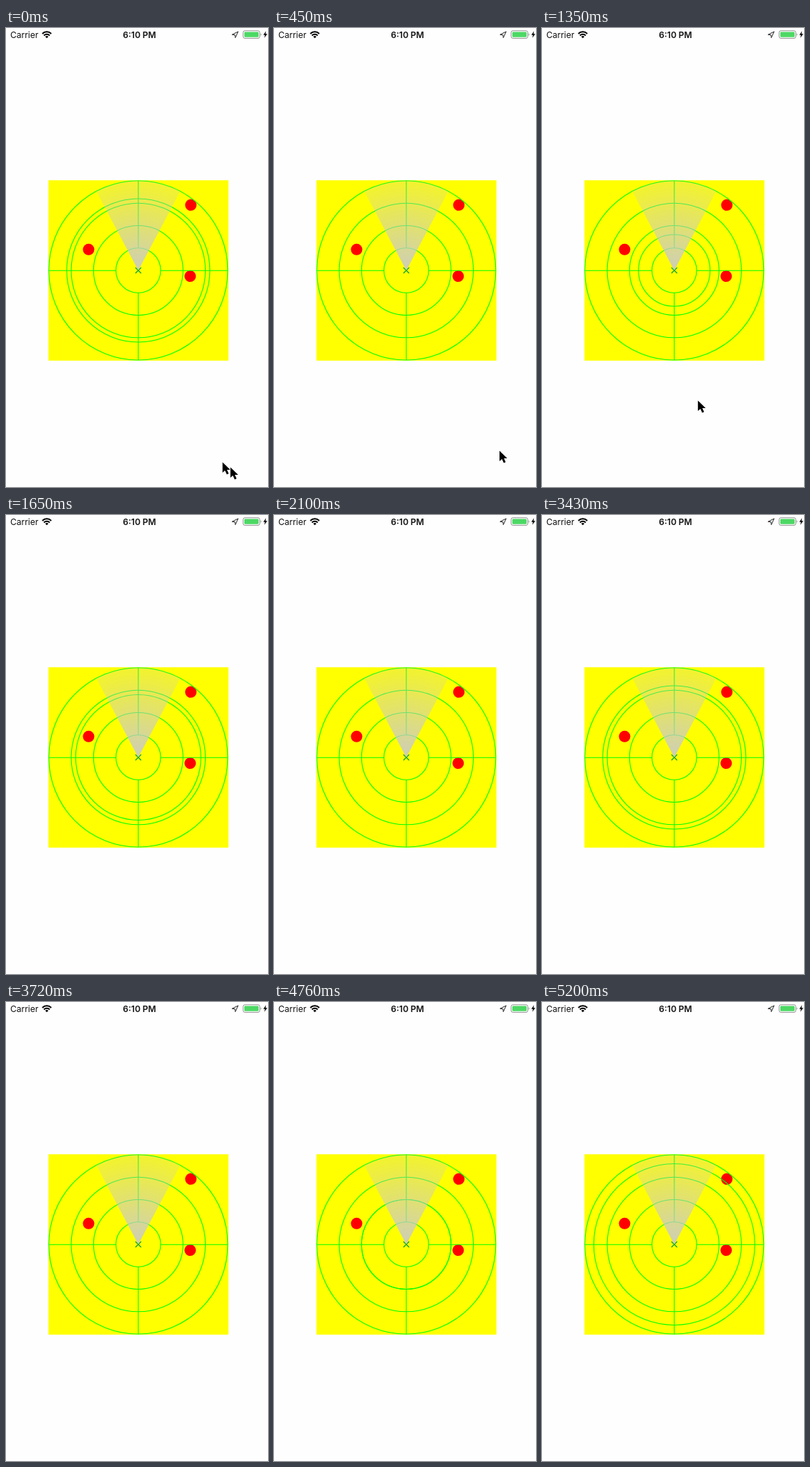
Write an HTML page that moves like this. It is 366 px wide and 640 px high and loops after 5.3 s.

```html
<!DOCTYPE html>
<html lang="en">
<head>
<meta charset="utf-8">
<title>Radar</title>
<style>
  html, body { margin: 0; width: 100%; height: 100%; overflow: hidden; background: #fefefe; }
  svg { display: block; width: 100vw; height: 100vh; }
  text { font: 12px Inter, "Liberation Sans", sans-serif; fill: #111; }
  .clock { font-weight: 600; text-anchor: middle; }
  .lines { fill: none; stroke: #0f0; stroke-width: 1.1; }
</style>
</head>
<body>
<svg viewBox="0 0 366 640">
  <defs>
    <radialGradient id="fade" gradientUnits="userSpaceOnUse" cx="0" cy="0" r="125">
      <stop offset="0" stop-color="#c8c8cd" stop-opacity=".9"/>
      <stop offset="1" stop-color="#c8c8cd" stop-opacity=".22"/>
    </radialGradient>
    <g id="arrow">
      <path d="M0 0V14.5L3.4 11.4L6 17L8.6 15.8L6.2 10.4H10.8Z"
            stroke="#fff" stroke-width="1.6" paint-order="stroke" stroke-linejoin="round"/>
    </g>
  </defs>

  <text x="6" y="13.5">Carrier</text>
  <text class="clock" x="186.5" y="13.5">6:10 PM</text>

  <g fill="none" stroke="#000" stroke-width="2">
    <path d="M50.8 8A8.6 8.6 0 0 1 63.2 8"/>
    <path d="M53 10.5A5.6 5.6 0 0 1 61 10.5"/>
  </g>
  <path d="M57 14.2L54.8 12A3.2 3.2 0 0 1 59.2 12Z"/>
  <path d="M315.8 9.3L324.3 5L320.3 13.6L319.8 9.6Z" fill="none" stroke="#222" stroke-width="1"/>
  <rect x="331.2" y="3.8" width="23.4" height="10.6" rx="2.6" fill="none" stroke="#888" stroke-width=".9"/>
  <rect x="332.9" y="5.4" width="20" height="7.4" rx="1.3" fill="#4cd964"/>
  <path d="M355.7 7.3Q357.6 9.1 355.7 10.9Z" fill="#888"/>
  <path d="M363.2 4.3L359.5 9.8H361.8L360.9 13.8L365 8.2H362.5Z"/>

  <g transform="translate(184.8 338)">
    <rect x="-125.5" y="-125.7" width="251.4" height="251.5" fill="#ff0"/>
    <g fill="#f00">
      <circle cx="-69.4" cy="-29.2" r="8"/>
      <circle cx="73.4" cy="-91.2" r="8"/>
      <circle cx="72.5" cy="8.1" r="8"/>
    </g>
    <g class="lines">
      <circle r="31.25"/><circle r="62.5"/><circle r="93.75"/><circle r="125"/>
      <path d="M0-125V-31.25M0 31.25V125M-125 .3H-31.25M31.25 .3H125"/>
      <path d="M-4-4L4 4M-4 4L4-4" stroke="#00a030"/>
      <circle id="pulse"/>
    </g>
    <path d="M0 0L-58.7-110.4A125 125 0 0 1 58.7-110.4Z" fill="url(#fade)"/>
  </g>

  <use id="ghost" href="#arrow" x="302.5" y="605.5"/>
  <use id="cursor" href="#arrow"/>
</svg>
<script>
const LOOP = 5300;
const PERIOD = 1680, OFFSET = 715, STEP = 100, RINGS = 10;
const $ = id => document.getElementById(id);
const pulse = $('pulse'), ghost = $('ghost'), cursor = $('cursor');

// The screen refreshes at uneven moments and holds in between.
const ticks = [...Array.from({ length: 15 }, (_, i) => i * 150),
  2700, 2850, 2990, 3130, 3280, 3430, 3570, 3720,
  4460, 4610, 4760, 4900, 5050, 5200];

// [time, x, y]
const cursorPath = [[0, 313.5, 612.5], [150, 314, 603], [300, 314.5, 595],
  [450, 315, 589.5], [1200, 268, 556], [1350, 217.8, 519.5]];
const CURSOR_END = 1500;

const show = (el, on) => el.setAttribute('visibility', on ? 'visible' : 'hidden');

function draw(time) {
  const t = ticks.findLast(tick => tick <= time);

  const ring = Math.floor((t + OFFSET) % PERIOD / STEP) + 1;
  show(pulse, ring <= RINGS);
  pulse.setAttribute('r', ring * 12.5);

  const [, x, y] = cursorPath.findLast(p => p[0] <= t);
  cursor.setAttribute('x', x);
  cursor.setAttribute('y', y);
  show(cursor, t < CURSOR_END);
  show(ghost, t === 0);
}

const start = performance.now();
function frame() {
  draw((performance.now() - start) % LOOP);
  requestAnimationFrame(frame);
}
frame();
</script>
</body>
</html>
```
